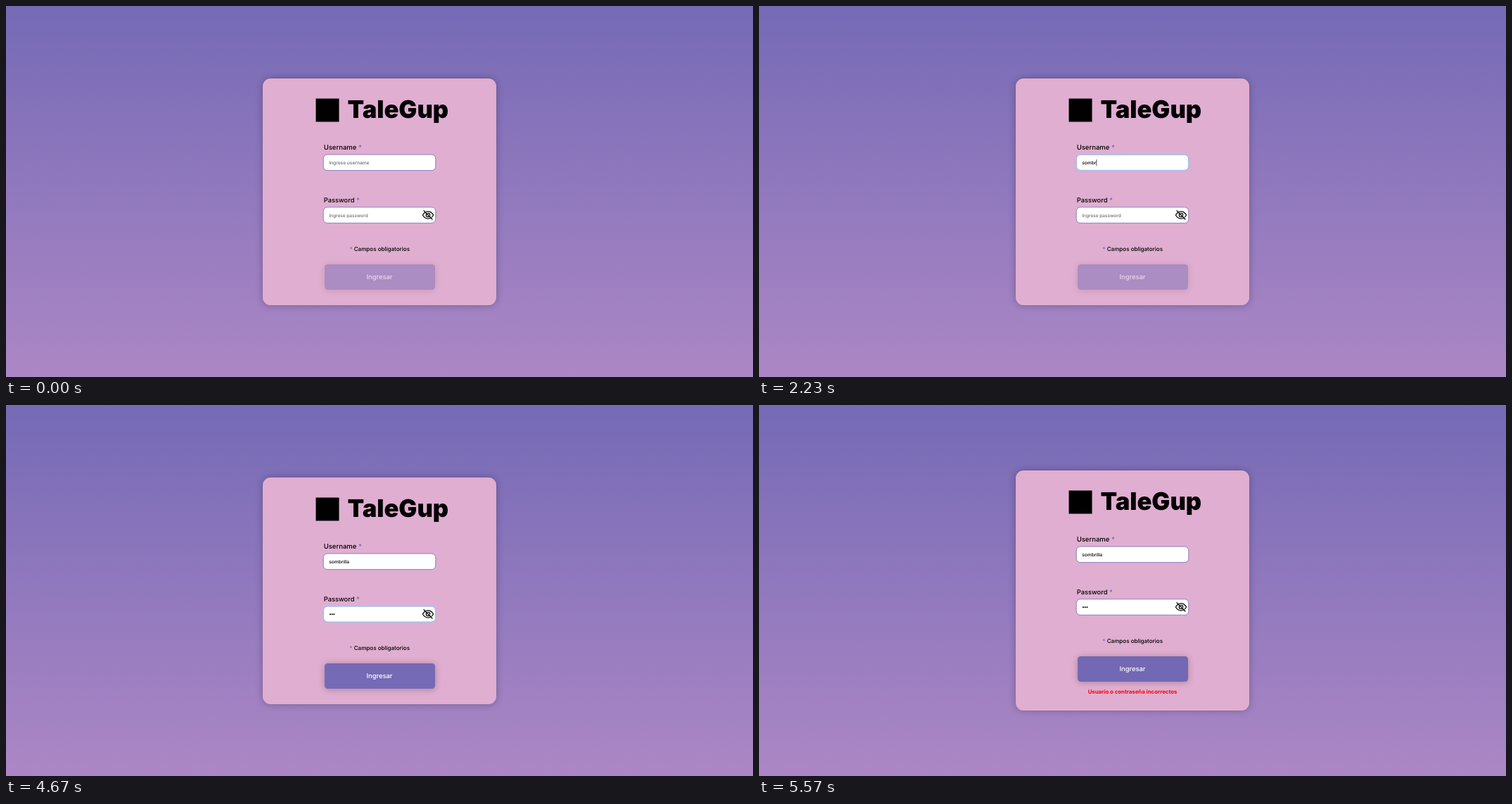
Recreate the animation shown at these times as an HTML page. Size 1062 by 527 pixels, loop 7.23 s.

```html
<!DOCTYPE html>
<html lang="es">
<head>
<meta charset="utf-8">
<title>Login</title>
<style>
  html, body { margin: 0; width: 100%; height: 100%; overflow: hidden; }
  body { position: relative; background: linear-gradient(#756ab6, #ac87c5); }
  div, svg { position: absolute; box-sizing: border-box; }
  #card {
    left: 365px; width: 332px; border-radius: 11px;
    background: #e0aed0; box-shadow: 0 0 11px rgba(0, 0, 0, .26);
  }
  #form { left: 0; top: 0; width: 1062px; height: 527px; }
  #button { left: 452.5px; top: 367px; width: 157px; height: 35.5px; border-radius: 4.5px; }
  svg { left: 0; top: 0; }
  .field { fill: #fff; stroke: #756ab6; stroke-width: .8; }
  .field.focus { stroke: #a9c0ea; stroke-width: 1.8; }
  text {
    font: 500 9.5px Inter, "Open Sans", sans-serif;
    text-rendering: geometricPrecision; white-space: pre;
  }
  .star { fill: #756ab6; }
  .hint { fill: #6c6c6c; }
  .mid { text-anchor: middle; }
</style>
</head>
<body>
<div id="card"></div>
<div id="form">
  <div id="button"></div>
  <svg width="1062" height="527" viewBox="0 0 1062 527">
    <rect x="440.5" y="131.5" width="33" height="33"/>
    <text x="485.5" y="158.5" style="font-size:34.5px;font-weight:900">TaleGup</text>
    <rect id="userBox" class="field" x="451.2" y="211.1" width="159.6" height="22.5" rx="5.6"/>
    <rect id="passBox" class="field" x="451.2" y="285.8" width="159.6" height="22.5" rx="5.6"/>
    <text x="451.7" y="204">Username <tspan class="star">*</tspan></text>
    <text x="451.7" y="278.7" style="font-size:9.35px">Password <tspan class="star">*</tspan></text>
    <text id="userHint" class="hint" x="459.3" y="225" style="font-size:6.65px">Ingrese username</text>
    <text id="userText" x="459.3" y="225" style="font-size:6.6px"></text>
    <text id="passHint" class="hint" x="459.3" y="299.7" style="font-size:6.5px">Ingrese password</text>
    <g id="dots"></g>
    <rect id="caret" width=".7"/>
    <g fill="none" stroke="#000" stroke-width="1.25" stroke-linecap="round" stroke-linejoin="round">
      <path d="M592.4 297Q595.4 291.9 600 291.9T607.6 297Q604.6 302.1 600 302.1T592.4 297Z"/>
      <circle cx="600" cy="297" r="2.7"/>
      <path d="M594.9 290.5L606.9 302.5" stroke="#fff" stroke-width="1"/>
      <path d="M594 290.8L606 303"/>
    </g>
    <text class="mid" x="531.2" y="347.5" style="font-size:8.05px"><tspan class="star">*</tspan> Campos obligatorios</text>
    <text id="label" class="mid" x="531" y="388.4" style="font-size:9.4px">Ingresar</text>
    <text id="error" class="mid" x="531" y="420" fill="#ff0000" style="font-size:7.8px;font-weight:700">Usuario o contraseña incorrectos</text>
  </svg>
</div>
<script>
const LOOP = 7230;
const NAME = "sombrilla";
const USER_KEYS = [1730, 1830, 1970, 2070, 2230, 2400, 2670, 2785, 2900];
const PASS_KEYS = [3670, 3830, 4130];
const FOCUS_USER = 400, FOCUS_PASS = 3100, HOVER = 4690, PRESS = 4930, FAIL = 5130, LEAVE = 5440;
const BLINK = 540;

const IDLE = [117, 106, 182], DARK = [47, 37, 98], RELEASED = [52, 40, 96], DISABLED = [171, 140, 195];

const $ = id => document.getElementById(id);
const show = (id, on) => $(id).style.display = on ? "" : "none";
const typed = (keys, t) => keys.filter(k => k <= t).length;
const mix = (a, b, p) => a + (b - a) * p;
const mixColor = (a, b, p) => a.map((v, i) => mix(v, b[i], p));
const rgb = c => `rgb(${c.map(Math.round)})`;

// smooth 0..1 ramp
function ramp(t, start, length) {
  const p = Math.min(1, Math.max(0, (t - start) / length));
  return p * p * (3 - 2 * p);
}

const dots = PASS_KEYS.map((_, i) => {
  const dot = document.createElementNS("http://www.w3.org/2000/svg", "circle");
  dot.setAttribute("cx", 461 + i * 2.7);
  dot.setAttribute("cy", 297.2);
  dot.setAttribute("r", 1.05);
  return $("dots").appendChild(dot);
});

function caretOn(t) {
  const resets = [FOCUS_USER, ...USER_KEYS, FOCUS_PASS, ...PASS_KEYS];
  const last = Math.max(...resets.filter(k => k <= t));
  // the first password key comes before a blink is seen
  if (last === FOCUS_PASS) return true;
  return (t - last) % (BLINK * 2) < (last === FOCUS_USER ? 530 : BLINK);
}

function drawCaret(t, inUser, inPass, chars) {
  const on = (inUser || inPass) && caretOn(t);
  show("caret", on);
  if (!on) return;
  const width = inUser ? (chars ? $("userText").getComputedTextLength() : 0) : chars * 2.7;
  const caret = $("caret");
  caret.setAttribute("x", 459.5 + width);
  caret.setAttribute("y", inUser ? 218 : 292.5);
  caret.setAttribute("height", 9);
}

function drawButton(t, enabled) {
  let color = DISABLED;
  if (enabled) {
    const over = ramp(t, HOVER, 250) * (1 - ramp(t, LEAVE, 145));
    color = mixColor(IDLE, t < FAIL ? DARK : RELEASED, over);
  }
  const press = ramp(t, PRESS, 150) * (1 - ramp(t, FAIL - 30, 45));
  const settle = ramp(t, FAIL, 140);
  const alpha = enabled ? mix(mix(.27, .4, press), .25, settle) : .13;
  const style = $("button").style;
  style.backgroundColor = rgb(color);
  style.boxShadow = `0 ${mix(1, 2, press)}px ${mix(10, 5, press)}px rgba(0,0,0,${alpha})`;
  $("label").setAttribute("fill", enabled ? "#fff" : "#f0d6e8");
}

function draw(t) {
  const userCount = typed(USER_KEYS, t), passCount = typed(PASS_KEYS, t);
  const inUser = t >= FOCUS_USER && t < FOCUS_PASS;
  const inPass = t >= FOCUS_PASS && t < PRESS;
  const failed = t >= FAIL;

  $("card").style.top = failed ? "93px" : "103px";
  $("card").style.height = failed ? "341px" : "322px";
  $("form").style.top = failed ? "-10px" : "0";
  show("error", failed);

  $("userBox").classList.toggle("focus", inUser);
  $("passBox").classList.toggle("focus", inPass);
  $("userText").textContent = NAME.slice(0, userCount);
  show("userHint", !userCount);
  show("passHint", !passCount);
  dots.forEach((dot, i) => dot.style.display = i < passCount ? "" : "none");

  drawCaret(t, inUser, inPass, inUser ? userCount : passCount);
  drawButton(t, passCount > 0);
}

let start;
function tick(now) {
  start ??= now;
  draw((now - start) % LOOP);
  requestAnimationFrame(tick);
}
draw(0);
requestAnimationFrame(tick);
</script>
</body>
</html>
```
